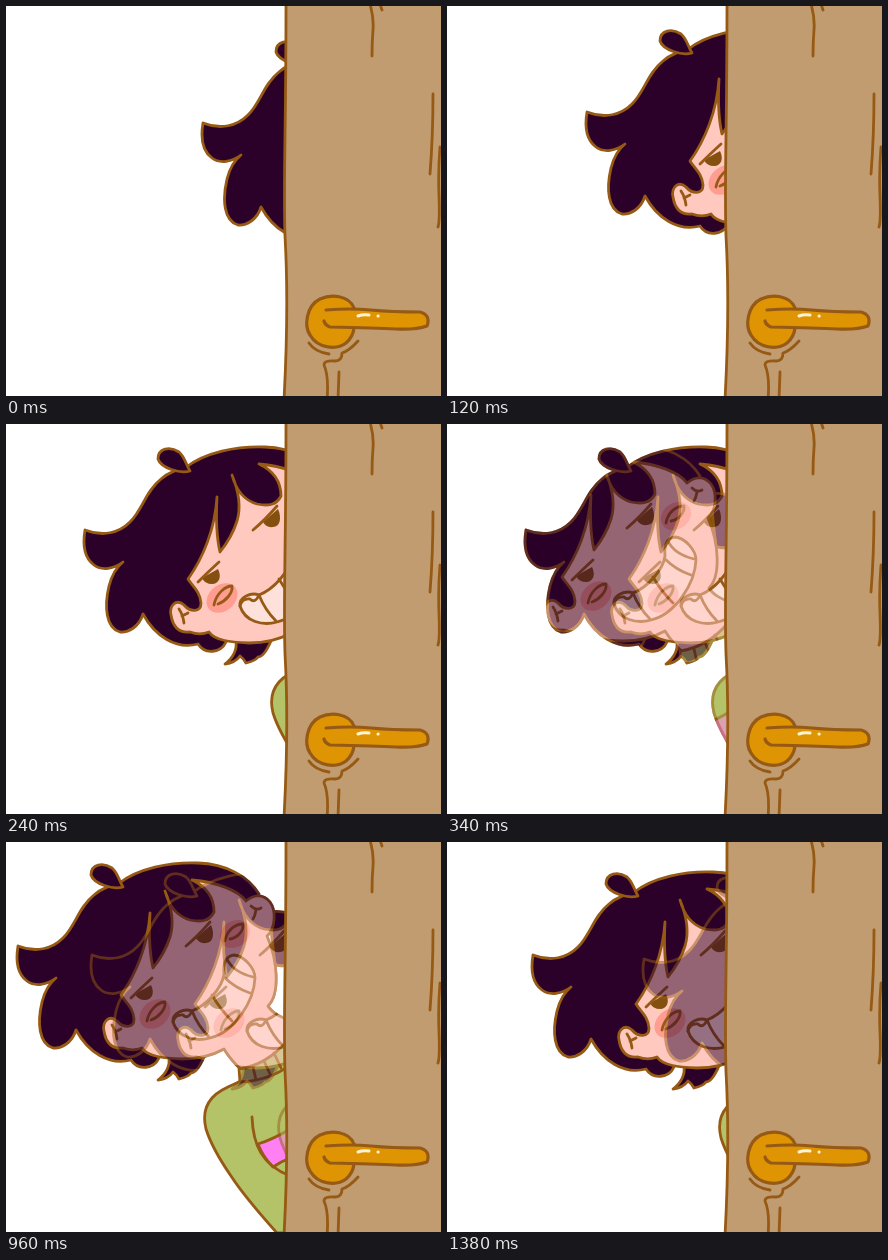
These frames come from a looping animation (435 px wide and 390 px high, 1400 ms). An HTML page:

```html
<!DOCTYPE html>
<html lang="en">
<head>
<meta charset="utf-8">
<title>Peekaboo behind the door</title>
<style>
  html, body { margin: 0; width: 100%; height: 100%; overflow: hidden; background: #fff; }
  svg { display: block; width: 435px; height: 390px; }
  .ink { fill: none; stroke: #965a14; stroke-width: 2.8; stroke-linecap: round; stroke-linejoin: round; }
  .hair { fill: #2b0029; }
  .skin { fill: #ffc9c0; }
  .knit { fill: #b4c268; }
  .teeth { fill: #ffe1dc; }
  .iris { fill: #84500f; stroke: none; }
  .blush { fill: #ff9d90; stroke: none; }
  .brass { fill: #df9503; }
</style>
</head>
<body>
<svg viewBox="0 0 435 390" xmlns="http://www.w3.org/2000/svg">
  <defs>
    <g id="girl" class="ink">
      <!-- hair behind the neck and the far ear -->
      <path class="hair" d="M163 214Q165 228 152 238Q162 237 167 230Q171 233 173 237Q182 235 185 231Q191 231 198 215Z"/>
      <path class="hair" d="M264 70Q274 68 284 72V121Q276 126 269 122Q266 100 264 70Z"/>
      <!-- jumper -->
      <path class="knit" d="M235 239C222 245 212 249 206 256C199 264 197 275 200 287C205 303 214 318 225 334C238 354 254 372 271 391H300V220Z"/>
      <path d="M252 302Q268 297 284 287V316Q274 320 267 325Q257 315 252 302Z" fill="#ff80f3"/>
      <path d="M246 275C247 303 256 323 284 334"/>
      <!-- head -->
      <path class="hair" d="M12 104C30 111 46 107 57 96C70 83 72 66 88 53C96 46 104 44 112 42C132 26 164 20 192 21C220 22 242 34 253 52L240 72L150 150L153 216C148 227 132 229 125 218C103 224 82 210 70 188C66 201 55 207 47 206C33 202 31 181 36 160Q40 144 50 136C41 143 29 145 21 139C10 131 10 116 12 104Z"/>
      <path class="hair" d="M117 45C107 48 88 42 85 33C85 22 97 20 106 26C112 31 113 39 117 45Z"/>
      <path class="skin" d="M144 71C142 103 130 132 115 153C119 160 127 165 128 177C128 187 117 186 111 179C103 172 96 180 98 189C100 202 107 207 117 206C125 209 131 208 136 206C142 215 158 216 176 217Q200 217 218 207Q226 220 238 230L284 206V179C275 175 266 171 262 164C274 152 272 119 261 94C270 86 270 68 264 60C257 51 247 53 240 59C232 48 210 40 186 38C201 45 208 56 208 70C203 80 194 80 184 78C170 74 163 64 159 49C166 66 168 82 164 95Q159 111 147 126C143 109 143 90 144 71Z"/>
      <path d="M106 183Q110 189 111 197M109 190L115 187M245 64Q250 69 255 66M250 68Q249 74 247 77"/>
      <ellipse class="blush" cx="149" cy="172" rx="17" ry="13" transform="rotate(-40 149 172)"/>
      <ellipse class="blush" cx="229" cy="92" rx="16" ry="13" transform="rotate(-35 229 92)"/>
      <path d="M141 179C143 168 152 160 159 160C160 167 153 175 145 178M219 99C221 88 229 82 237 82C238 89 231 96 224 97"/>
      <path class="iris" d="M129 152L145 143C149 151 146 158 139 158Q132 158 129 152Z"/>
      <path class="iris" d="M190 96L205 83C209 92 207 101 200 101Q193 102 190 96Z"/>
      <path d="M125 156Q135 146 146 136M180 104Q192 94 204 80"/>
      <!-- grin -->
      <path class="teeth" d="M186 169C201 163 216 146 218 132C217 121 220 114 228 113C238 114 249 126 249 136C248 159 229 190 204 196C190 200 172 196 167 180C166 171 178 166 186 169Z"/>
      <path d="M167 180Q169 172 177 173Q182 178 186 169Q192 184 203 195M206 153Q214 167 226 179M218 135Q229 146 244 151M221 117Q227 130 247 135"/>
      <!-- collar -->
      <path class="knit" d="M233 227C254 224 269 213 281 199L290 218C274 233 254 239 234 240Z"/>
      <path d="M247 225L250 238M258 219L264 232M268 211L275 226"/>
    </g>
    <mask id="shape" maskUnits="userSpaceOnUse" x="0" y="0" width="435" height="390" style="mask-type:alpha">
      <use id="cut" href="#girl"/>
    </mask>
  </defs>

  <rect width="435" height="390" fill="#fff"/>
  <use id="main" href="#girl"/>
  <g id="ghost" mask="url(#shape)"><g opacity=".5"><use id="next" href="#girl"/></g></g>

  <g class="ink">
    <path fill="#c19c70" d="M280 -4Q280 60 279 130T279 230Q283 300 278 394H440V-4Z"/>
    <path d="M364 -2Q368 12 367 24T366 50M374 -2L376 4M427 88Q427 130 424 168M434 141Q432 165 433 190T432 221"/>
    <path d="M303 337Q309 346 323 348M352 335Q343 345 336 347Q336 355 329 355Q318 354 318 359Q323 370 321 394M333 366L332 394"/>
    <g stroke-width="3.2">
      <path class="brass" d="M348 302C343 289 325 288 314 293C300 300 298 320 304 329C312 343 331 344 340 337Q347 331 348 322Z"/>
      <path class="brass" d="M320 304Q345 302 365 304T414 306Q425 309 421 320Q410 324 390 323T324 321Q319 319 318 315"/>
    </g>
    <path d="M352 310Q357 308 363 309M372 310h.2" stroke="#fff3d0" stroke-width="3"/>
  </g>
</svg>
<script>
  const LOOP = 1400;
  const away = [185, 13], peek = [128, 2], half = [67, 2], out = [0, 0], back = [74, 9];

  // end time, pose, and the pose that shows through it during a short blend
  const steps = [
    [100, away], [120, away, peek],
    [220, peek], [240, peek, half],
    [340, half], [360, half, out],
    [960, out], [980, out, back],
    [1380, back], [LOOP, back, away]
  ];

  const el = id => document.getElementById(id);
  const main = el("main"), cut = el("cut"), next = el("next"), ghost = el("ghost");
  const place = (node, [x, y]) => node.setAttribute("transform", `translate(${x} ${y})`);

  function draw(ms) {
    const t = ms % LOOP;
    const [, pose, blend] = steps.find(([end]) => t < end);
    place(main, pose);
    ghost.style.display = blend ? "" : "none";
    if (blend) {
      place(cut, pose);
      place(next, blend);
    }
  }

  const start = performance.now();
  function tick() {
    draw(performance.now() - start);
    requestAnimationFrame(tick);
  }
  tick();
</script>
</body>
</html>
```
